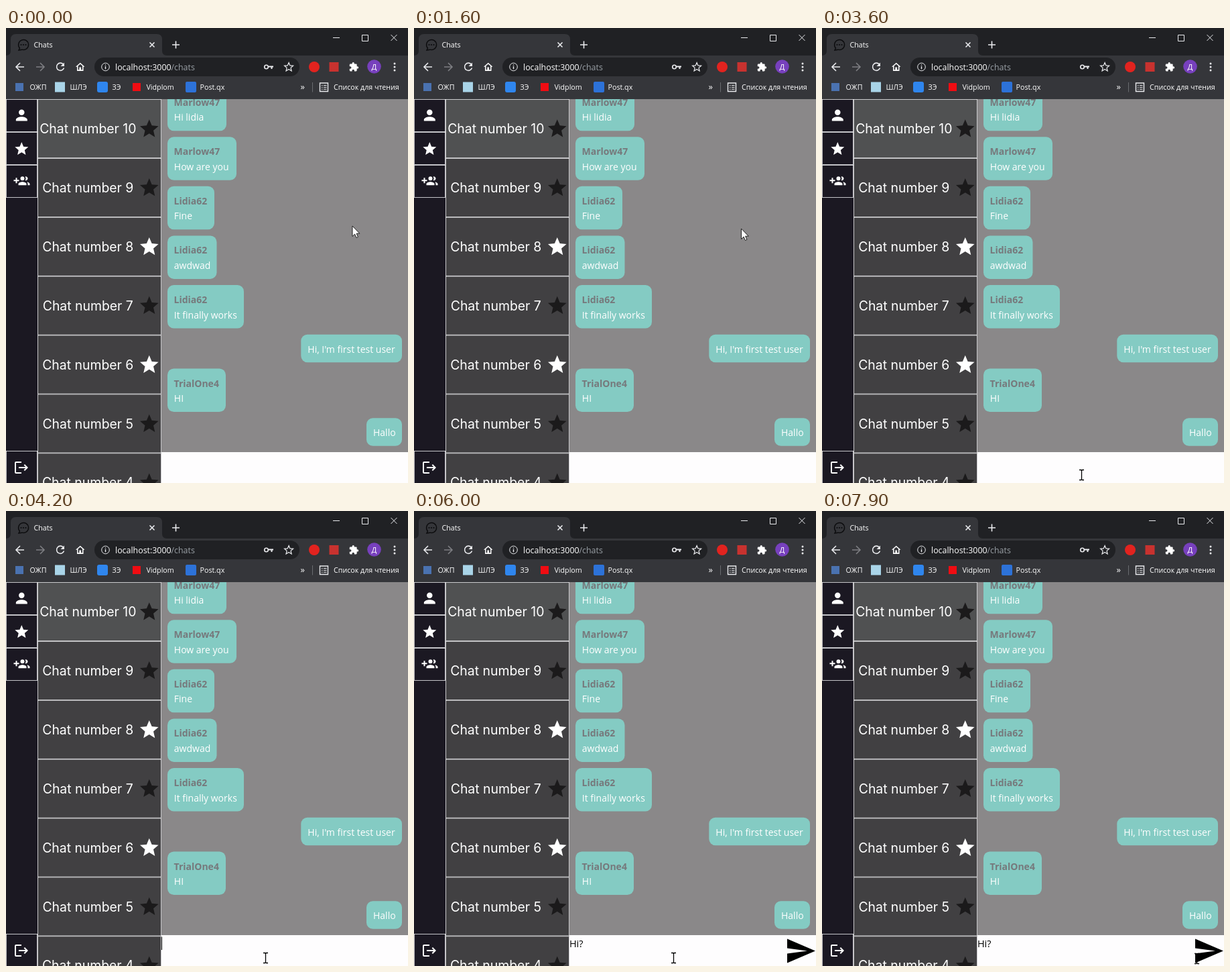
Animation of 600 by 678 pixels, one loop 8 s. Source, as an HTML page:

```html
<!DOCTYPE html>
<html lang="ru">
<head>
<meta charset="utf-8">
<title>Chats</title>
<style>
html, body { margin: 0; width: 100%; height: 100%; overflow: hidden; background: #202124; }
svg { display: block; width: 600px; height: 678px; }
text { font: 10.7px "Open Sans", "Noto Sans", sans-serif; fill: #fff; white-space: pre; }
.url { font-size: 12.4px; }
.msg { font-size: 14px; }
.name { font-size: 14px; font-weight: 700; fill: #76797c; }
.chat { font: 19.4px Inter, Lato, sans-serif; text-anchor: middle; }
.line { fill: none; stroke: #e9eaed; stroke-width: 1.6; }
.thin { fill: none; stroke: #e9eaed; stroke-width: 1; }
</style>
</head>
<body>
<svg id="stage" viewBox="0 0 600 678" xmlns="http://www.w3.org/2000/svg"></svg>
<script>
const LOOP = 8000, STEP = 100, BLINK = 530;
const ICON = {
  star: 'M12 17.27L18.18 21l-1.64-7.03L22 9.24l-7.19-.61L12 2 9.19 8.63 2 9.24l5.46 4.73L5.82 21z',
  person: 'M12 12c2.21 0 4-1.79 4-4s-1.79-4-4-4-4 1.79-4 4 1.79 4 4 4zm0 2c-2.67 0-8 1.34-8 4v2h16v-2c0-2.66-5.33-4-8-4z',
  invite: 'M8 10H5V7H3v3H0v2h3v3h2v-3h3zM18 11a3 3 0 1 0-.9-5.86a5 5 0 0 1 0 5.72zM13 11a3 3 0 1 0 0-6a3 3 0 0 0 0 6zM19.6 13.2C20.4 13.9 21 14.8 21 16v2h3v-2c0-1.5-2.4-2.5-4.4-2.8zM13 13c-2 0-6 1-6 3v2h12v-2c0-2-4-3-6-3z',
  logout: 'M17 7l-1.4 1.4L18.2 11H8v2h10.2l-2.6 2.6L17 17l5-5zM4 5h8V3H4a2 2 0 0 0-2 2v14a2 2 0 0 0 2 2h8v-2H4z',
  send: 'M2 21L23 12 2 3v7l15 2-15 2z',
  home: 'M12 3L2 12h3v9h14v-9h3zM7.2 10.3L12 6l4.8 4.3V18.7H14V13h-4v5.7H7.2z',
  puzzle: 'M20.5 11H19V7a2 2 0 0 0-2-2h-4V3.5a2.5 2.5 0 0 0-5 0V5H4a2 2 0 0 0-2 2v3.8h1.5a2.7 2.7 0 0 1 0 5.4H2V20a2 2 0 0 0 2 2h3.8v-1.5a2.7 2.7 0 0 1 5.4 0V22H17a2 2 0 0 0 2-2v-4h1.5a2.5 2.5 0 0 0 0-5z',
  arrow: 'M0 0V15.5L3.6 12.1L6 17.5L8.4 16.4L6.1 11.2H10.8z'
};

const rect = (x, y, w, h, fill, r = 0, extra = '') =>
  `<rect x="${x}" y="${y}" width="${w}" height="${h}" rx="${r}" fill="${fill}" ${extra}/>`;
const dot = (x, y, r, fill) => `<circle cx="${x}" cy="${y}" r="${r}" fill="${fill}"/>`;
const ring = (x, y, r, cls = 'line') => `<circle cx="${x}" cy="${y}" r="${r}" class="${cls}"/>`;
const text = (x, y, str, cls = '', extra = '') => `<text x="${x}" y="${y}" class="${cls}" ${extra}>${str}</text>`;
const line = (d, cls = 'line', extra = '') => `<path d="${d}" class="${cls}" ${extra}/>`;
const icon = (name, x, y, scale = 1, attrs = 'fill="#fff"') =>
  `<path d="${ICON[name]}" transform="translate(${x} ${y}) scale(${scale})" ${attrs}/>`;
// box with its border kept inside
const box = (x, y, w, h, fill) =>
  rect(x + 0.4, y + 0.4, w - 0.8, h - 0.8, fill, 0, 'stroke="#eeeef0" stroke-width=".8"');

function bubble(y, w, name, body) {
  return rect(241, y, w, 64.5, '#84cbc3', 9.5) +
    text(250.5, y + 27, name, 'name') + text(250.8, y + 49.5, body, 'msg');
}

function reply(x, y, body) {
  return rect(x, y, 591 - x, 41.5, '#84cbc3', 9.5) + text(x + 10, y + 27, body, 'msg');
}

function messages() {
  return rect(232, 100, 368, 532, '#8a8889') +
    bubble(88.7, 88, 'Marlow47', 'Hi lidia') +
    bubble(162.3, 103, 'Marlow47', 'How are you') +
    bubble(235.8, 70, 'Lidia62', 'Fine') +
    bubble(309.4, 73.5, 'Lidia62', 'awdwad') +
    bubble(383, 114, 'Lidia62', 'It finally works') +
    reply(440.3, 456.8, "Hi, I'm first test user") +
    bubble(507.5, 87, 'TrialOne4', 'HI') +
    reply(538, 581.3, 'Hallo') +
    rect(232, 632, 368, 46, '#fefdfe');
}

function chats() {
  let out = '';
  for (let i = 0; i < 7; i++) {
    const y = 106 + i * 87.9, id = 10 - i;
    const starred = id === 8 || id === 6;
    out += box(47, y, 185, 87.9, i ? '#414042' : '#505152') +
      text(122.3, y + 51, 'Chat number ' + id, 'chat') +
      icon('star', 197.2, y + 27.4, 1.38, `fill="${starred ? '#fff' : '#1b1a1b'}"`);
  }
  return out;
}

function sidebar() {
  let out = rect(0, 106, 47, 572, '#1b1822');
  for (const y of [106, 155, 204, 630]) out += box(0, y, 47, 49, '#1b1822');
  return out +
    icon('person', 10.6, 117.3, 1.06) +
    icon('star', 11.3, 168) +
    icon('invite', 11.5, 216.3) +
    icon('logout', 11, 643);
}

function tabs() {
  return rect(0, 0, 600, 42, '#202124') +
    '<path d="M0 41Q7 41 7 34V17Q7 9 15 9H225Q233 9 233 17V34Q233 41 240 41z" fill="#35363a"/>' +
    line('M20.5 30A7.5 7.5 0 1 1 24 32.2L19 33z', 'line', 'style="stroke:#0c0c0e;stroke-width:1.4"') +
    [22.5, 26, 29.5].map(x => dot(x, 25, 1.1, '#0c0c0e')).join('') +
    text(41.5, 28.5, 'Chats') +
    line('M214.5 21.5L221.5 28.5M221.5 21.5L214.5 28.5M248 25H259M253.5 19.5V30.5') +
    line('M488 14.5H498M531.5 10.5H540.5V19.5H531.5zM574.5 10L583.5 19M583.5 10L574.5 19', 'thin');
}

function toolbar() {
  return rect(0, 41, 600, 65, '#35363a') +
    line('M27 58H15.5M21 52L15 58L21 64') +
    line('M45 58H56.5M51 52L57 58L51 64', 'line', 'style="stroke:#7d7e82"') +
    line('M85.5 54.2A5.6 5.6 0 1 0 86.5 59.5') + '<path d="M87 51.5V57H81.5z" fill="#e9eaed"/>' +
    icon('home', 102.6, 49.6, 0.68) +
    rect(132, 44, 306, 28, '#202124', 14) +
    ring(148.5, 58, 5.8, 'thin') + line('M148.5 57V61.2M148.5 54.5V55.8', 'line', 'style="stroke-width:1.4"') +
    text(163, 62.5, 'localhost:3000<tspan fill="#9aa0a6">/chats</tspan>', 'url') +
    ring(388.5, 58, 2.8) + line('M391.5 57.5H399M396.5 58V61', 'line', 'style="stroke-width:2"') +
    icon('star', 414.3, 50.3, 0.65, 'fill="none" stroke="#e9eaed" stroke-width="1.9"') +
    dot(460, 58, 8, '#e2231f') +
    rect(482.5, 51, 14, 14, '#c8322f') +
    icon('puzzle', 511.5, 50.3, 0.64) +
    dot(549.5, 57.5, 10.3, '#7740bd') + text(549.5, 61.8, 'Д', '', 'text-anchor="middle" style="font-size:11.5px"') +
    [53, 58, 63].map(y => dot(580, y, 1.5, '#e9eaed')).join('');
}

function bookmarks() {
  return rect(14, 82, 12, 12, '#4a72b0') + text(35.5, 92, 'ОЖП') +
    rect(73, 80.5, 15, 15, '#a9d4e8') + text(95.5, 92, 'ШЛЭ') +
    rect(136, 80, 16, 16, '#2f86ee', 3) + text(158.5, 92, 'ЗЭ') +
    rect(189, 82, 12, 12, '#f00c12') + text(209.5, 92, 'Vidplom') +
    rect(268, 80, 16, 16, '#2d72d8', 2) + text(289.5, 92, 'Post.qx') +
    text(439.5, 92, '»', '', 'style="font-size:13px"') +
    line('M457.5 81V95.5', 'thin', 'style="stroke:#696b70"') +
    line('M468.5 82H480.5V94.5H468.5z', 'line', 'style="stroke-width:1.4"') +
    line('M471 85.5H472.5M474 85.5H478.5M471 88.3H472.5M474 88.3H478.5M471 91.2H472.5M474 91.2H478.5', 'thin') +
    text(489, 92, 'Список для чтения');
}

const stage = document.getElementById('stage');
stage.innerHTML = messages() + chats() + sidebar() + tabs() + toolbar() + bookmarks() +
  `<text id="draft" x="232" y="649.6" class="msg" style="fill:#000;font-size:14.4px"></text>
   <path id="caret" class="thin" style="stroke:#000"/>
   <g id="send">${icon('send', 553, 631.5, 2, 'fill="#000"')}</g>
   <g id="arrow">${icon('arrow', 0, 0, 1, 'fill="#fff" stroke="#111" stroke-width=".9"')}</g>
   <path id="beam" class="thin" style="stroke:#000;stroke-width:1.3" d="M-3.5 -7.5H-1L0 -6.5L1 -7.5H3.5M0 -6.5V6.5M-3.5 7.5H-1L0 6.5L1 7.5H3.5"/>`;

const [draft, caret, send, arrow, beam] =
  ['draft', 'caret', 'send', 'arrow', 'beam'].map(id => document.getElementById(id));

// pointer stops: time, x, y
const path = [
  [0, 517, 295], [900, 517, 295], [1500, 488.5, 299], [1700, 488.5, 299],
  [2500, 415, 529], [3200, 387.5, 666], [7300, 387.5, 666], [7800, 559.5, 667], [LOOP, 559.5, 667]
];
// typed text and the moment the caret blink restarts
const typing = [[3900, ''], [4400, 'H'], [4700, 'Hi'], [4990, 'Hi?']];
const ends = { '': 232.5, H: 242.5, Hi: 246, 'Hi?': 253 };

function pointer(t) {
  const i = path.findIndex(p => p[0] > t);
  const [t0, x0, y0] = path[i - 1], [t1, x1, y1] = path[i];
  const k = (t - t0) / (t1 - t0), e = k * k * (3 - 2 * k);
  return [x0 + (x1 - x0) * e, y0 + (y1 - y0) * e];
}

const show = (el, on) => el.setAttribute('visibility', on ? 'visible' : 'hidden');

function draw(t) {
  const [x, y] = pointer(t);
  const inField = y > 632;
  show(arrow, !inField);
  show(beam, inField);
  for (const el of [arrow, beam]) el.setAttribute('transform', `translate(${x} ${y})`);

  const typed = typing.filter(s => s[0] <= t).pop();
  const value = typed ? typed[1] : '';
  draft.textContent = value;
  show(send, value !== '');
  show(caret, typed && Math.floor((t - typed[0]) / BLINK) % 2 === 0);
  caret.setAttribute('d', `M${ends[value]} 634.5V654`);
}

function tick() {
  const t = performance.now() % LOOP;
  draw(Math.floor(t / STEP) * STEP);
  requestAnimationFrame(tick);
}
tick();
</script>
</body>
</html>
```
